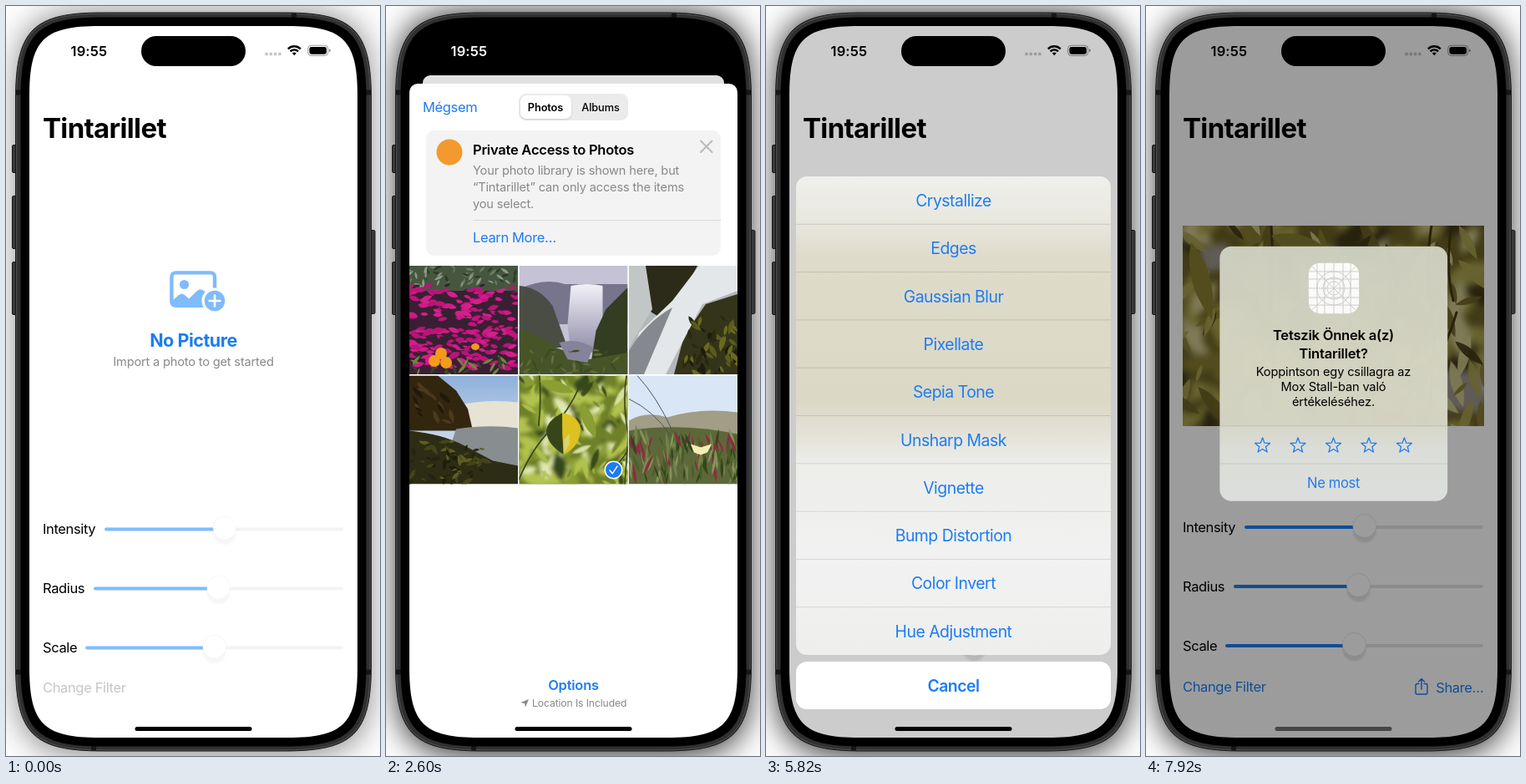
An HTML page that plays this animation: 448x898 px, repeating every 7990 ms.

```html
<!DOCTYPE html>
<html lang="en">
<head>
<meta charset="utf-8">
<title>Photo filter app</title>
<style>
html, body { margin: 0; width: 100%; height: 100%; overflow: hidden; background: #fff; }
:root {
  --blue: #1d7cf4;
  --spring: linear(0, .0902, .2642, .4422, .594, .7127, .8009, .8641, .9084, .9389, .9596,
    .9734, .9826, .9887, .9927, .9953, .997, .9981, .9988, .9993, 1);
}
#stage { display: block; width: 448px; height: 898px; }
text { font: 400 16.5px Inter, "Noto Sans", sans-serif; letter-spacing: -.022em; white-space: pre; }
.mid { text-anchor: middle; }
.end { text-anchor: end; }
.semi { font-weight: 600; letter-spacing: -.014em; }
.blue { fill: var(--blue); }
.gray { fill: #88888c; }
.big { font-size: 33px; font-weight: 700; letter-spacing: -.02em; }
.head { font-size: 21.5px; font-weight: 700; }
.s20 { font-size: 19.4px; letter-spacing: -.025em; }
.s15 { font-size: 14.6px; letter-spacing: -.012em; }
.s13 { font-size: 12.8px; letter-spacing: -.01em; }
.s12 { font-size: 12.2px; letter-spacing: -.01em; }
.line { fill: none; stroke-linecap: round; stroke-linejoin: round; }
.off { --fill: #80bcfd; --track: #f3f3f4; --lift: .35; }
.on { --fill: var(--blue); --track: #e2e2e4; --lift: 1; }

/* One loop is 7990 ms; the script sets the clock. */
.anim { animation: 7990ms linear infinite paused; }
.spring { animation-timing-function: var(--spring); }
.hard { animation-timing-function: step-end; }
#shadow { animation-name: focus; }
#app { animation-name: recede; transform-origin: 224.5px 24px; }
#card { animation-name: corner; }
#shade { animation-name: shade, corner; }
#sheet { animation-name: sheet; }
#add { animation-name: press; }
#empty { animation-name: before; }
#loaded { animation-name: after; }
#loading { animation-name: loading; }
#picker { animation-name: picker; }
#check { animation-name: check; }
#spin { animation: spin 799ms steps(8) infinite paused; transform-origin: 224.5px 482px; }
#clock { animation-name: clock; }
#icons { animation-name: icons; }
#filter { animation-name: tap; }
#dim { animation-name: dim; }
#actions { animation-name: actions; }
#veil, #alert, #home { animation: veil 438ms var(--spring) 7675ms both paused; }
#alert { animation-name: alert; transform-origin: 224.5px 440px; }
#home { animation-name: home; }

@keyframes focus { 0% { opacity: .42 } 6.258%, 100% { opacity: .75 } }
@keyframes recede {
  0%, 9.099%, 40.15%, 100% { transform: translateY(0) scale(1) }
  15.957%, 33.292% { transform: translateY(59px) scale(.9186) }
}
@keyframes corner { 0%, 9.099%, 40.15%, 100% { rx: 50px } 15.957%, 33.292% { rx: 10px } }
@keyframes shade { 0%, 9.099%, 40.15%, 100% { opacity: 0 } 15.957%, 33.292% { opacity: .12 } }
@keyframes sheet {
  0%, 9.099%, 40.15%, 100% { transform: translateY(783px) }
  15.957%, 33.292% { transform: translateY(0) }
}
@keyframes press { 0%, 8% { opacity: 1 } 8.01%, 9.1% { opacity: .35 } 12.39%, 100% { opacity: 1 } }
@keyframes before { 0% { opacity: 1 } 35.16%, 100% { opacity: 0 } }
@keyframes after { 0% { opacity: 0 } 35.16%, 100% { opacity: 1 } }
@keyframes loading { 0% { opacity: 1 } 13.26%, 100% { opacity: 0 } }
@keyframes picker { 0% { opacity: 0 } 13.26%, 100% { opacity: 1 } }
@keyframes check { 0% { opacity: 0 } 32.54%, 100% { opacity: 1 } }
@keyframes spin { to { transform: rotate(360deg) } }
@keyframes clock { 0%, 9.76% { color: #000 } 13.27%, 33.29% { color: #fff } 36.8%, 100% { color: #000 } }
@keyframes icons { 0%, 9.76% { color: #000 } 13.27%, 32.52% { color: #fff } 32.53%, 100% { color: #000 } }
@keyframes tap { 0% { opacity: 1 } 66.7% { opacity: .35 } 68.4%, 100% { opacity: 1 } }
@keyframes dim { 0%, 67.209%, 94.593%, 100% { opacity: 0 } 72.691%, 89.111% { opacity: .2 } }
@keyframes actions {
  0%, 67.209%, 94.593%, 100% { transform: translateY(674px) }
  72.691%, 89.111% { transform: translateY(0) }
}
@keyframes veil { from { opacity: 0 } to { opacity: .4 } }
@keyframes alert { from { opacity: 0; transform: scale(1.2) } to { opacity: 1; transform: none } }
@keyframes home { from { fill: #000 } to { fill: #484848 } }
</style>
</head>
<body>
<svg id="stage" viewBox="0 0 448 898" xmlns="http://www.w3.org/2000/svg">
  <defs>
    <clipPath id="screen"><path id="display"/></clipPath>
    <filter id="glow" x="-20%" y="-20%" width="140%" height="140%"><feGaussianBlur stdDeviation="17"/></filter>
    <filter id="soft" x="-30%" y="-30%" width="160%" height="160%"><feGaussianBlur stdDeviation="4"/></filter>
    <filter id="lift" x="-30%" y="-30%" width="160%" height="160%"><feGaussianBlur stdDeviation="1.2"/></filter>
    <linearGradient id="glass" x2="0" y2="1">
      <stop offset="0" stop-color="#eff0ec"/><stop offset=".09" stop-color="#e9e8df"/>
      <stop offset=".17" stop-color="#dedbca"/><stop offset=".47" stop-color="#dbd8c6"/>
      <stop offset=".54" stop-color="#e4e2d8"/><stop offset=".6" stop-color="#edeeea"/>
      <stop offset=".8" stop-color="#f1f2f1"/><stop offset="1" stop-color="#eeefed"/>
    </linearGradient>
    <linearGradient id="frost" x2="0" y2="1">
      <stop offset="0" stop-color="#cfd1c2"/><stop offset=".45" stop-color="#d6d6c5"/>
      <stop offset=".69" stop-color="#d7d7c8"/><stop offset=".8" stop-color="#dee0da"/>
      <stop offset="1" stop-color="#dee1df"/>
    </linearGradient>
    <linearGradient id="sky" x2="0" y2="1">
      <stop offset="0" stop-color="#8fb0dc"/><stop offset="1" stop-color="#eef2f4"/>
    </linearGradient>
    <linearGradient id="fall" x2="0" y2="1">
      <stop offset="0" stop-color="#f2f1f8"/><stop offset="1" stop-color="#8f8ca6"/>
    </linearGradient>
    <g id="sliders"></g>
  </defs>

  <rect width="448" height="898" fill="#fcfcfc"/>
  <path id="shadow" class="anim hard" filter="url(#glow)"/>

  <g fill="#3a3a3b" stroke="#161616">
    <rect x="7.5" y="166.5" width="8" height="33" rx="1.5"/>
    <rect x="7.5" y="227.5" width="8" height="63" rx="1.5"/>
    <rect x="7.5" y="306.5" width="8" height="63" rx="1.5"/>
    <rect x="434" y="268.5" width="8" height="100" rx="1.5"/>
  </g>
  <path id="frame" fill="#303032" stroke="#161616"/>
  <path id="rim" fill="none" stroke="#5c5c5e" stroke-width=".8"/>
  <path d="M12 103.5h6M431 103.5h6M12 797.5h6M431 797.5h6M345 9v5M105 886v5" stroke="#161617" stroke-width="6"/>
  <path id="bezel"/>

  <g clip-path="url(#screen)">
    <g id="app" class="anim spring">
      <rect id="card" class="anim spring" x="28" y="24" width="393" height="852" fill="#fff"/>
      <text class="big" x="44" y="157.7">Tintarillet</text>
      <g id="empty" class="anim hard">
        <g id="add" class="anim">
          <g fill="#7fbbfd">
            <path class="line" stroke="#7fbbfd" stroke-width="4.4" d="M236 358.8H203a4.6 4.6 0 0 1-4.6-4.6V324a4.6 4.6 0 0 1 4.6-4.6H245.4a4.6 4.6 0 0 1 4.6 4.6V338"/>
            <circle cx="213.5" cy="333.5" r="5.6"/>
            <path d="M199 353l8-7q3.5-3 7 0l5 4.5 10-9.5q4-3.5 8 0l5 4.5-6 14H199z"/>
            <circle cx="250" cy="353" r="15.5" fill="#fff"/>
            <circle cx="250" cy="353" r="12.3"/>
          </g>
          <path class="line" d="M243.5 353h13M250 346.5v13" stroke="#fff" stroke-width="2.6"/>
          <text class="head blue mid" x="224.5" y="407.8">No Picture</text>
          <text class="s15 gray mid" x="224.5" y="430.5">Import a photo to get started</text>
        </g>
        <use href="#sliders" class="off" y="2.5"/>
        <text x="44" y="822" fill="#c6c6c8">Change Filter</text>
      </g>
      <g id="loaded" class="anim hard">
        <svg id="photo" x="44" y="263" width="361" height="239.5" viewBox="0 0 361 239.5"></svg>
        <use href="#sliders" class="on"/>
        <text id="filter" class="blue anim hard" x="44" y="821">Change Filter</text>
        <path class="line" stroke="var(--blue)" stroke-width="1.4" d="M327 811.5h-2q-2 0-2 2V822q0 2 2 2h10q2 0 2-2v-8.5q0-2-2-2h-2M330 818V806M326.5 809l3.5-3.5 3.5 3.5"/>
        <text class="blue end" x="404.5" y="821.5">Share…</text>
      </g>
      <rect id="shade" class="anim spring" x="28" y="24" width="393" height="852"/>
    </g>

    <g id="sheet" class="anim spring">
      <rect x="28" y="93" width="393" height="800" rx="10" fill="#fff"/>
      <g id="loading" class="anim hard">
        <text class="blue" x="44" y="127">Cancel</text>
        <g id="spin"></g>
        <text class="s15 gray mid" x="224.5" y="520.8">Loading…</text>
      </g>
      <g id="picker" class="anim hard">
        <text class="blue" x="44" y="127">Mégsem</text>
        <rect x="159" y="105" width="131" height="32" rx="8.5" fill="#ebebec"/>
        <rect x="161" y="108" width="61" height="28" rx="7" opacity=".13" filter="url(#lift)"/>
        <rect x="161" y="107" width="61" height="28" rx="7" fill="#fff"/>
        <text class="s13 semi mid" x="191" y="126">Photos</text>
        <text class="s13 mid" x="257" y="126" style="font-weight: 500">Albums</text>

        <rect x="48" y="149" width="353" height="150" rx="10" fill="#f3f3f4"/>
        <circle cx="76" cy="175" r="15.5" fill="#f29a2e"/>
        <text class="semi" x="104" y="177.5">Private Access to Photos</text>
        <g class="gray">
          <text class="s15" x="104" y="202">Your photo library is shown here, but</text>
          <text class="s15" x="104" y="222">“Tintarillet” can only access the items</text>
          <text class="s15" x="104" y="242">you select.</text>
        </g>
        <path class="line" d="M377 161.5l13.500 13.500M390.500 161.500L377 175" stroke="#b9b9bc" stroke-width="2"/>
        <path d="M104 256.5H401" stroke="#d8d8da"/>
        <text class="blue" x="104" y="283">Learn More…</text>

        <svg id="flowers" x="28" y="311" width="130" height="130"></svg>
        <svg id="falls" x="159.5" y="311" width="130" height="130">
          <rect width="130" height="130" fill="#c4c2d4"/>
          <path d="M0 28q30-14 55-6l75 0V70H0z" fill="#77758c"/>
          <path d="M0 24q25 2 40 24l18 50H0z" fill="#4a4d44"/>
          <path d="M62 24q20-4 38 0v40l-6 40H62L58 70z" fill="url(#fall)"/>
          <path d="M130 26L104 52 92 78l-8 52h46z" fill="#343c22"/>
          <path d="M0 76q28 8 44 22l40 14 46-8v26H0z" fill="#475428"/>
          <path d="M48 92q22-6 40 6l-6 18-24-4z" fill="#85829b"/>
        </svg>
        <svg id="stream" x="291" y="311" width="130" height="130">
          <rect width="130" height="130" fill="#b4b7ba"/>
          <path d="M20 0h62L66 30 34 60 18 50z" fill="#2c2a18"/>
          <path d="M130 34L92 46 66 84l-12 46h76z" fill="#34341a"/>
          <path d="M0 0h20l8 52L0 98z" fill="#c2c6c6"/>
          <path d="M84 0h46v30L88 46 44 130H0l12-50 40-38z" fill="#e4e7ea"/>
          <path d="M0 102q20-34 52-52L18 130H0z" fill="#85898f"/>
        </svg>
        <svg id="shore" x="28" y="442.5" width="130" height="130">
          <rect width="130" height="130" fill="url(#sky)"/>
          <path d="M66 34q30-6 64-2v34H64z" fill="#e6e2d4"/>
          <path d="M0 0h34l22 18 14 22 6 26H0z" fill="#33260f"/>
          <path d="M56 64q40-6 74-1v48H40z" fill="#888d90"/>
          <path d="M0 66q40 4 66 18l34 18 30 6v22H0z" fill="#2d2c14"/>
        </svg>
        <svg id="leaves" x="159.5" y="442.5" width="130" height="130" viewBox="61 0 239.5 239.5"></svg>
        <svg id="dunes" x="291" y="442.5" width="130" height="130">
          <rect width="130" height="130" fill="#d9e6f5"/>
          <path d="M0 54q20-12 46-4 40-12 84-6v50H0z" fill="#a19d86"/>
          <path d="M0 66q60-10 130 4v60H0z" fill="#5d683a"/>
        </svg>
        <g id="check" class="anim hard">
          <circle cx="272.5" cy="555.5" r="10.2" fill="var(--blue)" stroke="#fff" stroke-width="1.5"/>
          <path class="line" d="M268 556l3.2 3.8 5.800-8.600" stroke="#fff" stroke-width="1.5"/>
        </g>
        <text class="blue semi mid" x="224.5" y="819">Options</text>
        <path d="M171 830l-4 9.500-1-4.500-4.800-1z" class="gray"/>
        <text class="s12 gray" x="175" y="839">Location Is Included</text>
      </g>
    </g>

    <rect id="dim" class="anim spring" x="28" y="24" width="393" height="852"/>
    <g id="actions" class="anim spring">
      <rect x="36" y="204" width="377" height="573" rx="13" fill="url(#glass)"/>
      <rect x="36" y="785" width="377" height="57" rx="13" fill="#fff"/>
      <text class="s20 blue semi mid" x="224.5" y="820.8">Cancel</text>
    </g>

    <rect id="veil" x="28" y="24" width="393" height="852"/>
    <g id="alert">
      <rect x="89" y="288.5" width="271.5" height="303.5" rx="14" fill="url(#frost)"/>
      <rect x="195" y="308.5" width="60" height="60" rx="13" fill="#fff"/>
      <g fill="none" stroke="#c9c9c9" stroke-width=".8">
        <path d="M199 312.5l52 52M251 312.5l-52 52M195 338.5h60M225 308.5v60M195 327.5h60M195 349.5h60M214 308.5v60M236 308.5v60M205 308.5v60M245 308.5v60M195 318.5h60M195 358.5h60"/>
        <circle cx="225" cy="338.5" r="8"/><circle cx="225" cy="338.5" r="13"/><circle cx="225" cy="338.5" r="20"/>
      </g>
      <text class="semi mid" x="224.5" y="400">Tetszik Önnek a(z)</text>
      <text class="semi mid" x="224.5" y="422">Tintarillet?</text>
      <text class="s15 mid" x="224.5" y="443">Koppintson egy csillagra az</text>
      <text class="s15 mid" x="224.5" y="461">Mox Stall-ban való</text>
      <text class="s15 mid" x="224.5" y="479">értékeléséhez.</text>
      <path d="M89 502.5h271.5M89 547.5h271.5" stroke="#000" stroke-opacity=".14" stroke-width=".8"/>
      <text class="blue mid" x="224.5" y="576">Ne most</text>
    </g>

    <rect x="162" y="36" width="125" height="36" rx="18"/>
    <g id="clock" class="anim"><text class="semi" x="77.5" y="59.5" fill="currentColor" style="letter-spacing: .01em">19:55</text></g>
    <g id="icons" class="anim" fill="currentColor">
      <path class="line" d="M312 57.5h.01M317.3 57.5h.01M322.6 57.5h.01M327.9 57.5h.01" stroke="currentColor" stroke-width="4" opacity=".22"/>
      <path d="M337.8 51.3a10.8 10.8 0 0 1 15 0M340.6 54.3a6.7 6.7 0 0 1 9.400 0" fill="none" stroke="currentColor" stroke-width="2.4"/>
      <path d="M342.8 56.6a3.6 3.6 0 0 1 5 0l-2.5 2.6z"/>
      <rect x="361.7" y="47.2" width="24" height="12.2" rx="3.8" fill="none" stroke="currentColor" stroke-opacity=".4"/>
      <rect x="363.4" y="48.9" width="20.6" height="8.8" rx="2.4"/>
      <path d="M387 51.3q1.8.6 1.8 2t-1.8 2z" opacity=".45"/>
    </g>
    <rect id="home" x="154.5" y="863" width="140" height="5" rx="2.5"/>
  </g>
</svg>

<script>
const $ = id => document.getElementById(id);
const add = (id, markup) => $(id).insertAdjacentHTML('beforeend', markup);

// Rectangle whose corners ease in over a length e.
function smooth(id, x, y, w, h, e) {
  const k = .2 * e, f = e - k, sx = w - 2 * e, sy = h - 2 * e;
  $(id).setAttribute('d', `M${x} ${y + e}c0 ${-f} ${k} ${-e} ${e} ${-e}h${sx}c${f} 0 ${e} ${k} ${e} ${e}
    v${sy}c0 ${f} ${-k} ${e} ${-e} ${e}h${-sx}c${-f} 0 ${-e} ${-k} ${-e} ${-e}z`);
}
smooth('shadow', 11, 5, 427, 894, 104);
smooth('frame', 11.5, 8, 426, 884, 104);
smooth('rim', 12.7, 9.2, 423.6, 881.6, 103);
smooth('bezel', 17.5, 13.5, 414, 873, 97);
smooth('display', 28, 24, 393, 852, 84);

let seed = 1;
const rnd = (a, b) => {
  seed = (seed * 16807) % 2147483647;
  return a + (b - a) * seed / 2147483647;
};
const pick = list => list[Math.floor(rnd(0, list.length))];

const leaf = (x, y, len, wide, turn, fill) =>
  `<path transform="translate(${x} ${y}) rotate(${turn})" fill="${fill}"
    d="M0 0Q${len * .45} ${-wide} ${len} 0Q${len * .45} ${wide} 0 0"/>`;

// Random leaf shapes inside a box [x, y, w, h].
const scatter = (n, [x, y, w, h], [min, max], slim, [t0, t1], colors) =>
  Array.from({ length: n }, () => {
    const len = rnd(min, max);
    return leaf(rnd(x, x + w), rnd(y, y + h), len, len * slim, rnd(t0, t1), pick(colors));
  }).join('');

function foliage(id, c) {
  seed = 7100071;
  const all = [-30, -30, 420, 270];
  add(id, `<rect width="361" height="240" fill="${c.base}"/>
    <g filter="url(#soft)">${scatter(150, all, [24, 70], .42, [0, 360], [c.dark, c.mid, c.light, c.light, c.pale])}
      <path d="M300 175h61v50l-50-6zM18 28l34-8 6 30-30 6z" fill="${c.haze}"/></g>
    <g opacity=".9">${scatter(95, all, [22, 60], .24, [20, 165], [c.dark, c.base, c.mid, c.light, c.light, c.pale])}</g>
    <path class="line" d="M106 0q4 60-2 110M298 0q-10 60 4 130l-8 110M322 0q-8 50 2 90M196 20Q170 80 130 120T60 230M258 214q50-40 70-110"
      stroke="${c.dark}" stroke-width="3"/>
    ${leaf(106, 12, 80, 24, 18, c.mid)}${leaf(198, 60, 84, 24, 68, c.mid)}${leaf(10, 20, 96, 22, 75, c.mid)}
    <path d="M157 82q-36 18-36 42 2 28 38 50z" fill="${c.dark}"/>
    <path d="M156 82q34 6 41 34-2 42-38 58-4-46-3-92z" fill="${c.leaf}"/>
    <path d="M160 142l12-14v24l-12 18z" fill="${c.pale}" opacity=".5"/>`);
}
foliage('photo', { base: '#6a6024', dark: '#403912', mid: '#877c30', light: '#aaa04e', pale: '#cfc88c', haze: '#9c948c', leaf: '#a9923c' });
foliage('leaves', { base: '#6f8128', dark: '#36461a', mid: '#8a9e34', light: '#b2c250', pale: '#e0e8b0', haze: '#a9a8b0', leaf: '#dcc120' });

seed = 9000009;
add('flowers', `<rect width="130" height="130" fill="#3a1f34"/><rect width="130" height="30" fill="#46563f"/>
  ${scatter(50, [0, 0, 130, 24], [5, 12], .3, [0, 360], ['#6c7c62', '#2c3a28', '#8b9a86'])}
  ${scatter(260, [-8, 24, 140, 98], [8, 16], .42, [-25, 25], ['#c4127c', '#d3208c', '#b8157a', '#cf1a86', '#2f2430'])}
  ${scatter(24, [0, 116, 130, 16], [8, 16], .25, [200, 340], ['#6c8a3c', '#2c4a24'])}
  <g fill="#f29a1c"><circle cx="38" cy="105" r="7"/><circle cx="30" cy="114" r="7"/><circle cx="44" cy="116" r="7"/><ellipse cx="79" cy="97" rx="5" ry="4"/></g>`);
add('falls', scatter(40, [0, 98, 130, 30], [6, 14], .25, [0, 180], ['#5c6d2e', '#3d4a20', '#6b6a4a']));
add('stream', scatter(50, [70, 58, 60, 70], [8, 20], .35, [30, 120], ['#5b5c1c', '#2a2a12', '#6a6a1e', '#1d1c10']));
add('shore', scatter(60, [0, 78, 88, 48], [6, 16], .35, [0, 180], ['#5d5d22', '#1f1d0c', '#44441a', '#26240f'])
  + scatter(16, [0, 4, 50, 52], [8, 20], .3, [20, 80], ['#4c3a1c', '#21180a']));
add('dunes', scatter(130, [0, 84, 130, 48], [14, 28], .14, [245, 295], ['#4a5e28', '#72824a', '#34451c', '#86925a', '#8a2d40'])
  + `<path class="line" d="M10 0q24 26 42 66M0 28q30 14 50 44" stroke="#4d5560"/>
    <path d="M74 82l12 4 13-4-5 10-8 3-8-3z" fill="#f3efb4"/>`);

[['Intensity', 118, 261.8], ['Radius', 105, 254.5], ['Scale', 95, 249.5]].forEach(([name, x, knob], i) => {
  const y = 623.5 + 71 * i;
  add('sliders', `<text x="44" y="${y + 6}">${name}</text>
    <rect x="${x}" y="${y - 1.5}" width="${404 - x}" height="4" rx="2" style="fill: var(--track)"/>
    <rect x="${x}" y="${y - 1.5}" width="${knob - x}" height="4" rx="2" style="fill: var(--fill)"/>
    <g style="opacity: var(--lift)">
      <circle cx="${knob}" cy="${y + 5}" r="14" fill-opacity=".1" filter="url(#lift)"/>
      <circle cx="${knob}" cy="${y - 1}" r="14.2" fill="#e2e2e2"/>
    </g>
    <circle cx="${knob}" cy="${y - 1}" r="13.6" fill="#fff"/>`);
});

for (let i = 0; i < 8; i++) {
  const shade = [.45, .34, .27, .23][i] || .14;
  add('spin', `<path class="line" d="M224.5 473.5v-5" stroke="#000" stroke-width="4.2"
    stroke-opacity="${shade}" transform="rotate(${270 - 45 * i} 224.5 482)"/>`);
}

['Crystallize', 'Edges', 'Gaussian Blur', 'Pixellate', 'Sepia Tone', 'Unsharp Mask',
  'Vignette', 'Bump Distortion', 'Color Invert', 'Hue Adjustment'].forEach((name, i) => {
  const y = 204 + 57.3 * i;
  if (i) add('actions', `<path d="M36 ${y}H413" stroke="#000" stroke-opacity=".15" stroke-width=".8"/>`);
  add('actions', `<text class="s20 blue mid" x="224.5" y="${y + 36}">${name}</text>`);
});

for (let i = 0; i < 5; i++) {
  const points = Array.from({ length: 10 }, (_, k) => {
    const r = k % 2 ? 4 : 9.4, a = k * Math.PI / 5;
    return [140 + 42.25 * i + r * Math.sin(a), 526 - r * Math.cos(a)];
  });
  add('alert', `<polygon class="line" points="${points.join(' ')}" stroke="var(--blue)" stroke-width="1.3"/>`);
}

// Motion is shown in 70 ms steps.
const LOOP = 7990, STEP = 70, OFFSET = 10;
const motions = document.getAnimations();
const start = performance.now();
function tick() {
  const t = (performance.now() - start) % LOOP;
  const time = Math.max(0, Math.floor((t - OFFSET) / STEP) * STEP + OFFSET);
  for (const m of motions) m.currentTime = time;
  requestAnimationFrame(tick);
}
tick();
</script>
</body>
</html>
```
